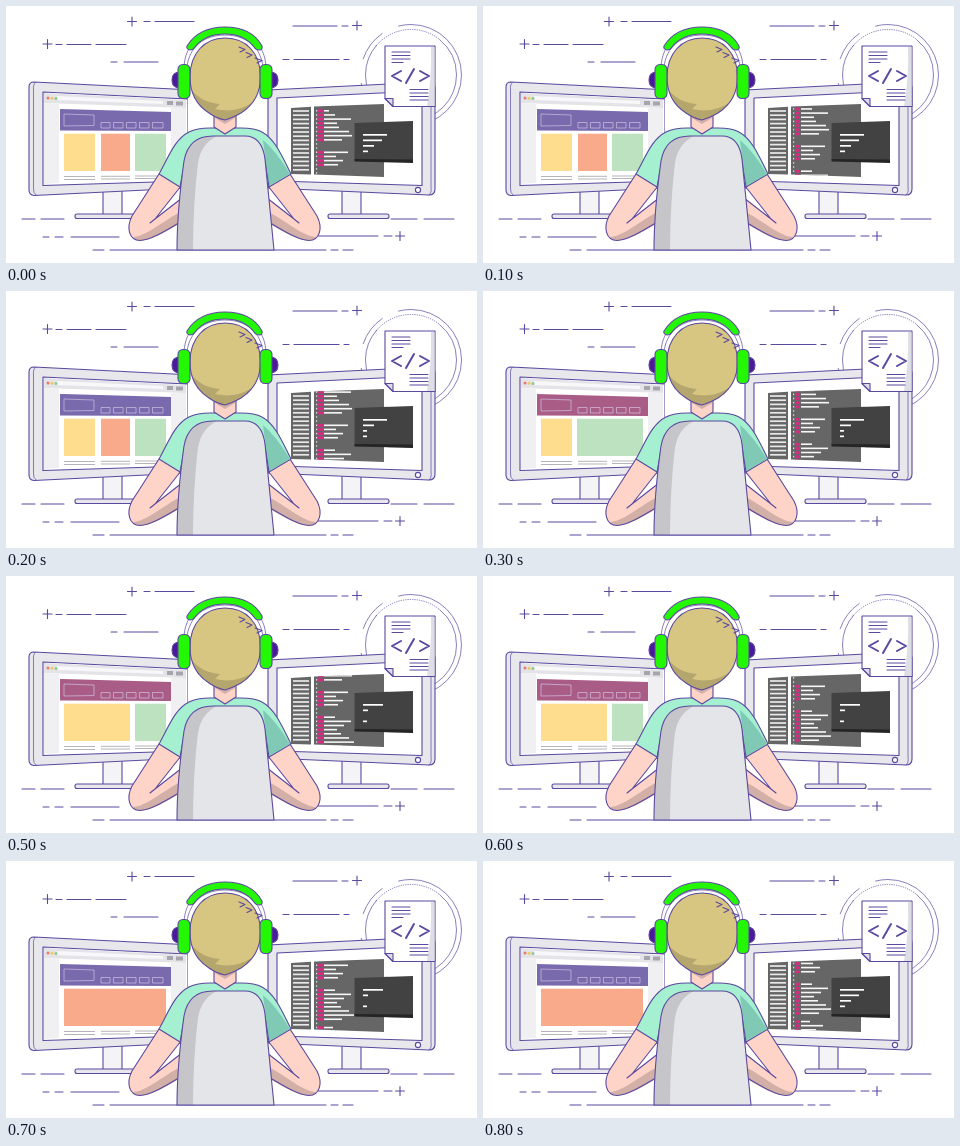
An HTML page that plays this animation: 471x257 px, repeating every 900 ms.

```html
<!DOCTYPE html>
<html lang="en">
<head>
<meta charset="utf-8">
<title>Coder at work</title>
<style>
html, body { margin: 0; width: 100%; height: 100%; overflow: hidden; background: #fff; }
svg { display: block; width: 100%; height: 100%; }
.ink { stroke: #5b489f; stroke-width: 1.1; stroke-linejoin: round; stroke-linecap: round; }
.line { fill: none; }
.thin { stroke-width: .7; }
.bold { stroke-width: 2; }
.shell { fill: #e7e7ec; }
.skin { fill: #fdd4c7; }
.shade { fill: #d2afa7; }
</style>
</head>
<body>
<svg viewBox="0 0 471 257" preserveAspectRatio="none">
  <defs>
    <clipPath id="codeClip"><path d="M308 100.5L378 98V171L308 168.5Z"/></clipPath>
    <clipPath id="hairClip"><path id="hairShape" d="M184 71C184 47 199 32 219 32C240 32 254.500 47 254.500 71C254.500 88 246 100 235 107Q226 112 219 114Q210 112 203 107C192 100 184 88 184 71Z"/></clipPath>
    <path id="chairShape" d="M171 244C171 214 174 184 178 155C181 138 191 130 207 130H239C250 130 257 138 259 153L268 244Z"/>
    <clipPath id="chairClip"><use href="#chairShape"/></clipPath>
    <g id="stand" class="ink">
      <path fill="#f4f4f7" d="M97 184H116V209H97Z"/>
      <rect class="shell" x="69" y="208" width="61" height="4.500" rx="2"/>
    </g>
    <g id="arm">
      <path class="skin" d="M153 168L126 210C120 222 123 234 134 234.500C144 234 158 226 176 215V192L149 213L175 180Z"/>
      <path class="shade" d="M127 231C139 231 157 215 176 205V216C158 227 146 234 134 234.500Q129 234 127 231Z"/>
      <path class="ink line" d="M153 168L126 210C120 222 123 234 134 234.500C144 234 158 226 176 215M176 192L149 213L175 180M149 213L144 217"/>
    </g>
    <g id="cup" class="ink">
      <path fill="#4b199a" d="M174 66Q166 66 166 74Q166 82 174 82Z"/>
      <rect x="172" y="58.500" width="12" height="34" rx="5" fill="#24f704"/>
    </g>
  </defs>

  <g class="ink line">
    <path d="M37 38H46M41.500 33.500V42.500M121.500 15.500H130.500M126 11V20M346.500 19.500H355.500M351 15V24M389.500 230H398.500M394 225.500V234.500"/>
    <path d="M50 38.500H56M61 38.500H85M90 38.500H120M138 15.500H144M149 15.500H188M105 56H111M118 56H152M287 20H331M336 20H342M277 53.500H283M288 53.500H333M338 53.500H343"/>
    <path d="M16 213H29M35 213H58M385 213H411M418 213H448M37 231H43M49 231H57M65 231H113M307 230H372M378 230H386M87 244H98M104 244H320M325 244H332M337 244H347"/>
    <circle class="thin" cx="405" cy="69" r="50.500" stroke-dasharray="150 25 32 18 92"/>
    <circle class="thin" cx="405" cy="69" r="45.500" stroke-dasharray="175 70 41"/>
    <path class="thin" stroke-dasharray=".5 1.800" d="M370 40A45.500 45.500 0 0 1 433 33"/>
  </g>

  <use href="#stand"/>
  <use href="#stand" transform="matrix(-1 0 0 1 452 0)"/>

  <g class="ink">
    <path class="shell" d="M28 76L177 83.500Q181 84 181 89V182L28 189.500Q23 189 23 184V81Q23 76 28 76Z"/>
    <path class="line thin" d="M29 77Q27 78 27.500 84V182Q27 187 30 189"/>
    <path fill="#fff" d="M181 93L37 86V179.500L181 175"/>
    <path class="shell" d="M262 84L423 76Q429 76 429 82V183Q429 189 423 189L262 182Z"/>
    <path class="line thin" d="M423 77Q426 79 425 86V181Q426 187 423 189"/>
    <path fill="#fff" d="M271 92L416 85V179.500L271 175Z"/>
    <circle cx="412" cy="184" r="2.600" fill="#fff"/>
  </g>

  <path fill="#e4e4e8" d="M38 87L180 94V102L38 97Z"/>
  <path fill="#f8f8fa" d="M51 90L157 95V98L51 94Z"/>
  <path fill="#a6a5ad" d="M161 95H167V99H161ZM170 95.500H177V99.500H170Z"/>
  <path fill="#f0f0f2" d="M38 97L53 98V177L38 178ZM165 102L180 102V174L165 175Z"/>
  <circle cx="42" cy="92" r="1.500" fill="#ec7970"/>
  <circle cx="46" cy="92.200" r="1.500" fill="#edcb63"/>
  <circle cx="50" cy="92.400" r="1.500" fill="#8bc995"/>
  <path id="banner" d="M54 103L165 106V125L54 124.500Z"/>
  <path fill="none" stroke="#d2c1e2" stroke-width=".7" d="M58 108L88 109V119.500L58 120ZM95 116.500H104V122H95ZM107.500 116.500H117V122H107.500ZM120.500 116.500H130V122H120.500ZM133.500 116.500H143V122H133.500ZM146.500 116.500H157V122H146.500Z"/>
  <g id="cards"></g>
  <path stroke="#b5b4b9" d="M58 170.500H89M95 170.300H124M129 170H160M58 173.500H89M95 173H124M129 172.500H160"/>

  <path fill="#666667" d="M285 102L305 100.700V168.500L285 168ZM308 100.500L378 98V171L308 168.500Z"/>
  <g id="outline" stroke="#e9e9ea" stroke-width="1.700"></g>
  <g id="code" clip-path="url(#codeClip)"></g>
  <path fill="#424242" d="M348.500 117L407 115V155L348.500 154Z"/>
  <path fill="#252525" d="M348.500 153L407 153.500V157L348.500 155.500Z"/>
  <g id="terminal"></g>

  <g class="ink">
    <path fill="#fff" d="M379 40H429V100.500H387L379 92.500Z"/>
    <path fill="#dedee5" stroke="none" d="M425 41H428.500V100H421Q426 72 425 41Z"/>
    <path fill="#dcdbe7" d="M379 92.500H387V100.500Z"/>
    <path class="line" d="M386 46H404M386 49.500H404M386 53H404M386 56.500H397M404 83.500H422M404 87H422M404 90.500H422M404 94H422"/>
    <path class="line bold" d="M395 65L386 70L395 75M414 65L423 70L414 75M408 63L400 77"/>
  </g>

  <use href="#arm"/>
  <use href="#arm" transform="matrix(-1 0 0 1 437 0)"/>
  <path class="ink" fill="#a4f0d1" d="M153 168C163 150 169 133 183 126Q191 122 204 122H235Q249 122 256 126C269 133 276 150 285 168L263 181L253 175H184L174 181Z"/>
  <path fill="#7fc9b5" d="M257 134Q270 145 284 168L263 180Z"/>
  <path class="ink line" d="M174 181L180 149M263 181L258 149"/>
  <path class="skin" d="M208 104H230V121L219 128L208 121Z"/>
  <path class="shade" d="M209 108H229V112L219 118L209 112Z"/>
  <path class="ink line" d="M208 108V121L219 128L230 121V108"/>
  <use href="#chairShape" fill="#e4e5e8"/>
  <path clip-path="url(#chairClip)" fill="#c6c6ca" d="M168 246L174 165Q179 129 213 129Q195 137 192 157Q187 199 187 246Z"/>
  <use href="#chairShape" class="ink line"/>

  <path class="ink line thin" d="M178 61C179 38 195 24 219 24S259 38 260 61M181 61C183 41 198 29 219 29S255 41 257 61"/>
  <use href="#hairShape" fill="#d7c681"/>
  <path clip-path="url(#hairClip)" fill="#b5a66d" d="M180 76Q192 97 214 98L209 103Q230 108 247 96L237 116H197L180 91Z"/>
  <use href="#hairShape" class="ink line"/>
  <path class="ink line" d="M233 41l6 2.500l-5 2.500M240 46.500l6 2.500l-5 2.500M249 52l7 2.500l-5 2.500"/>
  <path class="ink" fill="#24f704" d="M181 40C189 27 203 21 219 21S249 27 256 40Q257 44 253 44Q250 44 248 41C241 32 231 28 219 28S196 32 189 41Q187 44 184 44Q180 43 181 40Z"/>
  <use href="#cup"/>
  <use href="#cup" transform="matrix(-1 0 0 1 438 0)"/>
</svg>
<script>
const STEP = 100, STEPS = 9;
const YELLOW = '#fedd8e', ORANGE = '#f9aa8b', GREEN = '#bce2bf';
const PURPLE = '#7969ad', MAGENTA = '#a95d86';
const byId = id => document.getElementById(id);
const rect = (x, y, w, h, fill) =>
  `<rect x="${x}" y="${y}" width="${w}" height="${h}" fill="${fill}"/>`;

// Each layout: banner colour, then cards as [left, right, colour].
const three = [PURPLE, [58, 89, YELLOW], [95, 124, ORANGE], [129, 160, GREEN]];
const greenWide = [MAGENTA, [58, 89, YELLOW], [94, 160, GREEN]];
const yellowWide = [MAGENTA, [58, 124, YELLOW], [129, 160, GREEN]];
const full = [PURPLE, [58, 160, ORANGE]];
const layouts = [three, three, three, greenWide, greenWide, yellowWide, yellowWide, full, full];

// Code lines scroll upwards; zero is an empty line.
const codeWidths = [5, 11, 27, 13, 15, 25, 28, 18, 0, 0, 24, 12, 19, 14, 0, 0,
  11, 27, 20, 13, 17, 25, 30, 18, 0, 9, 22, 15];
const PITCH = 4.15, SCROLL = 6;
const prompts = [[24, 19, 11, 5], [24, 11, 4, 4], [20, 5, 0, 4]];
const promptOrder = [0, 0, 1, 1, 0, 2, 2, 2, 0];

function codeRow(width, y) {
  const margin = rect(310, y, 1.2, 1.5, '#ddd');
  if (!width) return margin;
  return margin + rect(312, y - .5, 5, 2.7, '#d72b83') + rect(318, y, width, 1.6, '#f7f7f7');
}

function draw(step) {
  const [banner, ...cards] = layouts[step];
  byId('banner').setAttribute('fill', banner);
  byId('cards').innerHTML = cards.map(([l, r, fill]) =>
    rect(l, 127.7, r - l, 37.3, fill)).join('');
  byId('code').innerHTML = codeWidths.map((w, i) =>
    codeRow(w, 104 + i * PITCH - step * SCROLL)).join('');
  byId('terminal').innerHTML = prompts[promptOrder[step]].map((w, i) =>
    rect(357, 128 + i * 5.5, w, 1.7, '#fff')).join('');
}

byId('outline').innerHTML = Array.from({ length: 15 }, (_, i) =>
  `<path d="M287 ${105 + i * 4.2}h16"/>`).join('');

let shown = -1;
function tick() {
  const step = Math.floor(performance.now() / STEP) % STEPS;
  if (step !== shown) draw(shown = step);
  requestAnimationFrame(tick);
}
tick();
</script>
</body>
</html>
```
